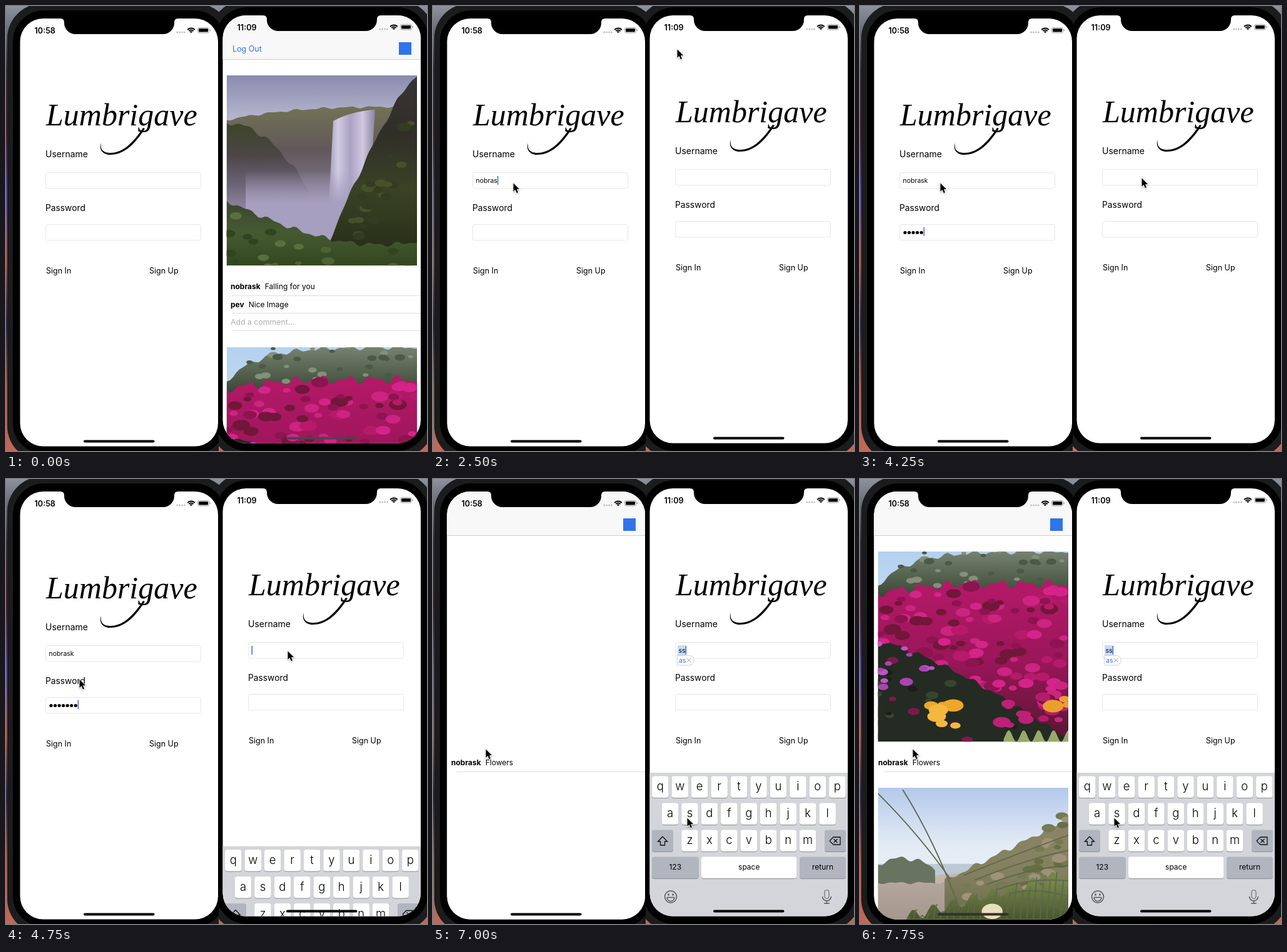
Write an HTML page with a canvas that moves like this. It is 673x712 px and loops after 8000 ms.

```html
<!DOCTYPE html>
<html lang="en">
<head>
<meta charset="utf-8">
<title>Two phones signing in</title>
<style>
  html, body { margin: 0; width: 100%; height: 100%; overflow: hidden; background: #000; }
  canvas { display: block; }
</style>
</head>
<body>
<canvas id="stage" width="673" height="712"></canvas>
<script>
const ctx = document.getElementById('stage').getContext('2d');
const LOOP = 8000, STEP = 250;
const BLUE = '#2f74e8';
const APP = 'Lumbrigave', USER = 'nobrask', FRIEND = 'pev';

// ---------- helpers ----------
const clamp = (v, lo, hi) => Math.min(hi, Math.max(lo, v));

function box(x, y, w, h, r, fill, stroke) {
  ctx.beginPath();
  ctx.roundRect(x, y, w, h, r);
  if (fill) { ctx.fillStyle = fill; ctx.fill(); }
  if (stroke) { ctx.strokeStyle = stroke; ctx.lineWidth = 1; ctx.stroke(); }
}

function text(str, x, y, size, { color = '#000', weight = 400, align = 'left' } = {}) {
  ctx.font = `${weight} ${size}px Inter, sans-serif`;
  ctx.fillStyle = color;
  ctx.textAlign = align;
  ctx.fillText(str, x, y);
  return ctx.measureText(str).width;
}

function line(points, color, width = 1) {
  ctx.beginPath();
  points.forEach(([x, y]) => ctx.lineTo(x, y));
  ctx.strokeStyle = color;
  ctx.lineWidth = width;
  ctx.stroke();
}

function arc(x, y, r, from, to, color, width) {
  ctx.beginPath();
  ctx.arc(x, y, r, from, to);
  ctx.strokeStyle = color;
  ctx.lineWidth = width;
  ctx.stroke();
}

function cross(x, y, r, color, width) {
  line([[x - r, y - r], [x + r, y + r]], color, width);
  line([[x + r, y - r], [x - r, y + r]], color, width);
}

function oval(color, x, y, rx, ry = rx) {
  ctx.beginPath();
  ctx.ellipse(x, y, rx, ry, 0, 0, Math.PI * 2);
  ctx.fillStyle = color;
  ctx.fill();
}

// Evenly spaced colours from y0 down to y1
function fade(y0, y1, ...colors) {
  const g = ctx.createLinearGradient(0, y0, 0, y1);
  colors.forEach((c, i) => g.addColorStop(i / (colors.length - 1), c));
  return g;
}

function clipped(path, draw) {
  ctx.save();
  ctx.beginPath();
  path();
  ctx.clip();
  draw();
  ctx.restore();
}

// ---------- photos, in a unit square ----------
function photo(y, sky, paint) {
  ctx.save();
  ctx.translate(28.7, y);
  ctx.scale(304.3, 304.3);
  clipped(() => ctx.rect(0, 0, 1, 1), () => {
    ctx.fillStyle = fade(0, .6, ...sky);
    ctx.fillRect(0, 0, 1, 1);
    paint();
  });
  ctx.restore();
}

// Everything below the curve y = height(x)
function hill(fill, height, from = 0, to = 1) {
  ctx.beginPath();
  ctx.moveTo(from, 1);
  for (let i = 0; i <= 60; i++) {
    const x = from + (to - from) * i / 60;
    ctx.lineTo(x, height(x));
  }
  ctx.lineTo(to, 1);
  ctx.fillStyle = fill;
  ctx.fill();
}

function scatter(seed, count, colors, size, place) {
  const random = () => (seed = seed * 16807 % 2147483647) / 2147483647;
  for (let i = 0; i < count; i++) {
    const [x, y] = place(random(), random());
    const r = size * (.6 + .8 * random());
    oval(colors[i % colors.length], x, y, r, r * .6);
  }
}

const rough = x => .008 * Math.sin(47 * x) + .006 * Math.sin(83 * x);

function waterfall() {
  hill(fade(.16, .85, '#717354', '#62575a', '#80788e', '#a19aba'),
    x => .165 + .07 * (1 - x) ** 3 + rough(x) / 2);
  hill(fade(.25, .75, '#3d4528', '#4b4546', '#6d6579', '#968fac00'),
    x => .25 + 1.9 * x * x + rough(x), 0, .5);
  const fall = ctx.createLinearGradient(.52, 0, .78, 0);
  ['#9089aa', '#d2cce2', '#aaa2c4', '#cfc8e0', '#8a83a2'].forEach((c, i) => fall.addColorStop(i / 4, c));
  ctx.beginPath();
  ctx.moveTo(.56, .24);
  ctx.quadraticCurveTo(.65, .19, .78, .18);
  ctx.lineTo(.74, .8);
  ctx.lineTo(.53, .8);
  ctx.fillStyle = fall;
  ctx.fill();
  hill(fade(.5, .85, '#a69fbf00', '#a69fbf', '#a69fbf'), () => .5, .1, .75);
  hill(fade(0, .9, '#383435', '#302e28', '#3a4225', '#283019'),
    x => .87 * ((1 - x) / .46) ** 1.25 + rough(x), .54);
  const slope = (u, v) => [.6 + .4 * u, .87 * ((.4 - .4 * u) / .46) ** 1.25 + .12 + .3 * v];
  scatter(5, 24, ['#46502a', '#333b22'], .03, slope);
  const bank = x => .66 + .23 * Math.sin(x * 1.95) + rough(x);
  hill(fade(.65, 1, '#3a4430', '#465a31', '#32471f'), bank);
  scatter(11, 40, ['#587040', '#304420', '#4b6335'], .025, (u, v) => [u, bank(u) + .04 + .3 * v]);
}

function flowers() {
  hill(fade(0, .25, '#76826f', '#56634f', '#374334'), x => .18 * Math.exp(-6 * x) + rough(x));
  scatter(3, 30, ['#4b5947', '#829079'], .02, (u, v) => [.12 + .88 * u, .2 * v]);
  const crest = x => .17 + .05 * (1 - x) ** 4 + 2 * rough(x);
  hill(fade(.15, 1, '#b51968', '#9a165a', '#54172f'), crest);
  scatter(7, 150, ['#cd2381', '#711739', '#b71a6b', '#d42489', '#8c1451'], .034,
    (u, v) => [u, crest(u) + .02 + .72 * v]);
  hill('#242b22', x => .47 + .52 * x ** 1.3 + rough(x));
  scatter(19, 30, ['#38452e', '#1a1f1b', '#7c1a4a'], .025, (u, v) => [u, .55 + .5 * u ** 1.3 + .4 * v]);
  scatter(23, 12, ['#bd56c9', '#a944b2'], .026, (u, v) => [.3 * u, .48 + .25 * v]);
  scatter(29, 8, ['#c01f78'], .035, (u, v) => [.65 + .35 * u, .8 + .12 * v]);
  scatter(31, 8, ['#eea62a', '#f4b83f'], .04, (u, v) => [.28 + .13 * u, .8 + .13 * v]);
  scatter(37, 3, ['#e9a02b'], .04, (u, v) => [.92 + .08 * u, .77 + .05 * v]);
  hill('#9aa869', x => .97 + .03 * Math.sin(80 * x), .66);
}

function dunes() {
  hill('#bccad6', () => .4, 0, .5);
  hill(fade(.45, .7, '#c6bab2', '#a79a91'), x => .49 - .1 * x);
  hill('#68745f', x => .37 + 2 * (x - .13) ** 2 + rough(x), 0, .3);
  hill(fade(.48, .7, '#b5a79e', '#a4978c'), x => .5 + rough(x) / 2, 0, .4);
  hill(fade(.2, .7, '#8b8465', '#83805f', '#6a6b48'), x => .49 - .5 * (x - .35) + rough(x), .35);
  scatter(41, 40, ['#747a52', '#a09279', '#666f43'], .03, (u, v) => [.45 + .55 * u, .52 - .4 * u + .3 * v]);
  const tufts = x => .72 - .27 * x + .03 * Math.sin(60 * x);
  hill(fade(.5, .75, '#75854c', '#3a4723'), tufts, .12);
  const blade = (x0, y0, cx, cy, x1, y1) => {
    ctx.beginPath();
    ctx.moveTo(x0, y0);
    ctx.quadraticCurveTo(cx, cy, x1, y1);
    ctx.strokeStyle = '#5d684b';
    ctx.lineWidth = .006;
    ctx.stroke();
  };
  blade(0, .03, .22, .25, .38, .48);
  blade(.13, .01, .3, .28, .43, .64);
  for (let i = 0; i < 6; i++) blade(1, .25 + i * .08, .8, .32 + i * .05, .45 + i * .06, .46 + i * .025);
  for (let x = .15; x < 1; x += .035) blade(x, .75, x, .65, x + .02, tufts(x));
  oval('#e8dfbd', .6, .65, .055, .04);
}

const flowerPhoto = y => photo(y, ['#b4d1f0', '#d3e3f3'], flowers);

// ---------- screens, in the left phone's coordinates ----------
function navBar() {
  ctx.fillStyle = '#f8f8f8';
  ctx.fillRect(22, 20, 318, 70);
  line([[22, 90.5], [340, 90.5]], '#cfcfd1');
  box(304, 63, 20, 20, 0, BLUE);
}

function comment(name, words, x, y) {
  const w = text(name, x, y, 12, { weight: 700 });
  text(words, x + w + 7, y, 12);
}

const rule = y => line([[38, y + .5], [340, y + .5]], '#dedee0');

function busyFeed() {
  navBar();
  text('Log Out', 38, 78, 12.5, { color: BLUE });
  photo(116, ['#8a8cae', '#c3c2d8', '#8f89a6'], waterfall);
  comment(USER, 'Falling for you', 35, 458);
  comment(FRIEND, 'Nice Image', 35, 487);
  text('Add a comment…', 35, 515, 12.3, { color: '#aeaeb2' });
  for (let i = 0; i < 3; i++) rule(468 + i * 28);
  flowerPhoto(551);
}

function freshFeed(t) {
  navBar();
  if (t < 7000) return;
  comment(USER, 'Flowers', 29, 458);
  rule(468);
  if (t >= 7250) flowerPhoto(116);
  if (t >= 7500) photo(494, ['#b3c9ea', '#e3ebf5', '#eef1f4'], dunes);
}

function wordmark() {
  ctx.font = 'italic 50px "Liberation Serif", serif';
  ctx.fillStyle = '#000';
  ctx.textAlign = 'left';
  ctx.fillText(APP, 64, 191);
  ctx.beginPath();
  ctx.moveTo(222, 196);
  ctx.bezierCurveTo(203, 226, 186, 238, 166, 238);
  ctx.bezierCurveTo(154, 238, 148, 228, 152, 219);
  ctx.bezierCurveTo(150, 231, 157, 235, 167, 235);
  ctx.bezierCurveTo(185, 235, 201, 222, 219, 195);
  ctx.fill();
}

const caret = (x, y) => box(x, y - 7, 1.5, 14, 0, '#4169d8');

function login({ name = '', dots = 0, focus, pressed, suggest }) {
  wordmark();
  text('Username', 63, 242, 14);
  text('Password', 63, 328, 13.8);
  [266.5, 349.5].forEach(y => box(63.5, y, 248, 25.5, 3.5, '#fff', '#e6e6e8'));
  text('Sign In', 64, 428, 12.5, { color: pressed ? '#555' : '#000' });
  text('Sign Up', 229, 428, 12.5);

  if (suggest) box(67, 271, 13, 16, 0, '#c9dbf7');
  const w = text(name, 68.5, 283, 10.5);
  for (let i = 0; i < dots; i++) oval('#000', 72 + i * 6.55, 362.5, 2.6);
  if (focus === 'name') caret(68.5 + w, 279);
  if (focus === 'password') caret(68.8 + dots * 6.55, 361);
  if (suggest) {
    box(66.5, 287.5, 27, 15.5, [0, 8, 8, 2], '#fff', '#cfcfd2');
    text('as', 69, 299, 10.5, { color: BLUE });
    cross(85, 295, 3.5, '#aaa', 1);
  }
}

function key(x, y, w, fill = '#fff') {
  box(x, y + 1, w, 34.5, 4, '#8c8e93');
  box(x, y, w, 34.5, 4, fill);
}

function wideKey(label, x, w, fill) {
  key(x, 609.5, w, fill);
  text(label, x + w / 2, 630, 12, { align: 'center' });
}

function keyboard(drop) {
  const grey = '#b0b5bf', ink = '#555960', pitch = 31.45;
  ctx.save();
  ctx.translate(0, drop);
  ctx.fillStyle = '#d3d5da';
  ctx.fillRect(22, 475, 318, 235);
  ['qwertyuiop', 'asdfghjkl', 'zxcvbnm'].forEach((letters, row) => {
    const y = 480.5 + row * 43;
    [...letters].forEach((ch, i) => {
      const x = 181 + (i - letters.length / 2) * pitch + 2.3;
      key(x, y, 26.5);
      text(ch, x + 13.2, y + 22.5, 18.5, { weight: 300, align: 'center' });
    });
  });
  key(26, 566.5, 34, grey);
  key(302, 566.5, 34, grey);
  wideKey('123', 26, 74.5, grey);
  wideKey('space', 105, 152.5);
  wideKey('return', 262, 74, grey);

  line([[43, 577], [35.5, 585], [39.5, 585], [39.5, 591], [46.5, 591], [46.5, 585], [50.5, 585], [43, 577]], '#111', 1.3);
  line([[310, 584], [316, 578], [327, 578], [327, 590], [316, 590], [310, 584]], '#111', 1.3);
  cross(319.5, 584, 3, '#111', 1.3);

  arc(56, 673.5, 9.5, 0, Math.PI * 2, ink, 1.5);
  arc(56, 674.5, 6, 0, Math.PI, ink, 1.5);
  line([[50, 674.5], [62, 674.5]], ink, 1.5);
  [52.5, 59.5].forEach(x => oval(ink, x, 670, 1.3, 1.8));
  box(302, 662.5, 7, 14, 3.5, null, ink);
  arc(305.5, 673, 7, 0, Math.PI, ink, 1.5);
  line([[305.5, 680], [305.5, 684]], ink, 1.4);
  line([[301, 684], [310, 684]], ink, 1.4);
  ctx.restore();
}

// ---------- phone ----------
function statusBar(clock) {
  text(clock, 45.5, 43.5, 12.6, { weight: 600 });
  for (let i = 0; i < 4; i++) oval('#c3c3c6', 273.7 + i * 3.9, 42, 1.5);
  for (let r = 2; r < 9; r += 3) arc(296, 43.5, r, -Math.PI * .76, -Math.PI * .24, '#000', 2);
  box(306.5, 34.5, 18, 8.5, 2.5, null, '#a0a0a0');
  box(308, 36, 15, 5.5, 1.2, '#000');
  box(325.6, 37.2, 1.3, 3, .6, '#a0a0a0');
}

function notch() {
  box(93, 14, 176, 31, [0, 0, 18, 18], '#000');
  ctx.beginPath();
  for (const [edge, side] of [[93, -1], [269, 1]]) {
    ctx.moveTo(edge, 26);
    ctx.quadraticCurveTo(edge, 20, edge + side * 6, 20);
    ctx.lineTo(edge, 19);
  }
  ctx.fill();
}

function phone(clock, barColor, screen) {
  box(2, -4, 358, 732, 56, '#1b1c1d');
  box(11, 7, 340, 710, 50, '#000');
  clipped(() => ctx.roundRect(22.5, 20, 316.5, 684.5, 37), () => {
    ctx.fillStyle = '#fff';
    ctx.fillRect(22, 20, 318, 686);
    screen();
    statusBar(clock);
    box(124, 694.5, 113.5, 4, 2, barColor);
  });
  notch();
}

function pointer([x, y]) {
  ctx.save();
  ctx.translate(x + .5, y + .5);
  ctx.scale(.92, .92);
  ctx.beginPath();
  [[0, 0], [0, 14.5], [3.4, 11.4], [5.8, 17], [8.2, 16], [5.9, 10.5], [10.4, 10.4]]
    .forEach(([px, py]) => ctx.lineTo(px, py));
  ctx.closePath();
  ctx.shadowColor = '#0005';
  ctx.shadowBlur = 3;
  ctx.shadowOffsetY = 1;
  ctx.strokeStyle = '#fff';
  ctx.lineWidth = 1.8;
  ctx.stroke();
  ctx.shadowColor = 'transparent';
  ctx.fillStyle = '#000';
  ctx.fill();
  ctx.restore();
}

// ---------- timeline ----------
// Each move: begins, ends, target x, target y
function glide(start, moves, t) {
  return moves.reduce(([x, y], [begin, end, toX, toY]) => {
    const k = clamp((t - begin) / (end - begin), 0, 1);
    return [x + (toX - x) * k, y + (toY - y) * k];
  }, start);
}

const leftPointer = t => glide([215, 600],
  [[250, 1000, 140, 303], [1250, 1500, 128, 283], [4500, 5500, 84, 432]], t);
const rightPointer = t => glide([560, 330],
  [[250, 1000, 404, 65], [1250, 1500, 397, 69], [2000, 2250, 390, 69],
   [3250, 4250, 450, 275], [4750, 5750, 410, 537], [5750, 6000, 406, 542]], t);

// Characters typed since a start time
const typed = (t, start, perStep, max) => clamp(Math.floor((t - start) / STEP * perStep), 0, max);

function leftScreen(t) {
  login({
    name: USER.slice(0, typed(t, 1750, 2, USER.length)),
    dots: typed(t, 3250, 1.3, 8),
    focus: t < 1500 ? null : t < 3000 ? 'name' : 'password',
    pressed: t >= 5750
  });
  if (t < 6000) return;
  ctx.save();
  ctx.translate(0, 684 * (1 - clamp((t - 5750) / 750, 0, 1)) ** 2);
  ctx.fillStyle = '#fff';
  ctx.fillRect(22, 20, 318, 690);
  freshFeed(t);
  ctx.restore();
}

function rightScreen(t) {
  if (t < 2250) return busyFeed();
  login({
    name: 'ss'.slice(0, typed(t, 5750, 1, 2)),
    focus: t >= 4750 ? 'name' : null,
    suggest: t >= 6500
  });
  keyboard(235 * (1 - clamp((t - 4500) / 500, 0, 1)));
}

function render(t) {
  ctx.fillStyle = fade(0, 712, '#8d929d', '#33313b', '#4a1e2e', '#554da8', '#a5524c', '#29274b', '#a85749', '#c0695a');
  ctx.fillRect(0, 0, 673, 712);

  clipped(() => ctx.rect(0, 0, 340, 712), () => {
    phone('10:58', t >= 7500 ? '#303030' : '#000', () => leftScreen(t));
    if (t >= STEP) pointer(leftPointer(t));
  });
  clipped(() => ctx.rect(340, 0, 333, 712), () => {
    ctx.save();
    ctx.translate(324, -5);
    phone('11:09', t < 2250 ? '#4a444a' : '#000', () => rightScreen(t));
    ctx.restore();
    if (t >= STEP) pointer(rightPointer(t));
  });
}

function tick() {
  const t = performance.now() % LOOP;
  render(Math.floor(t / STEP) * STEP);
  requestAnimationFrame(tick);
}
tick();
</script>
</body>
</html>
```
